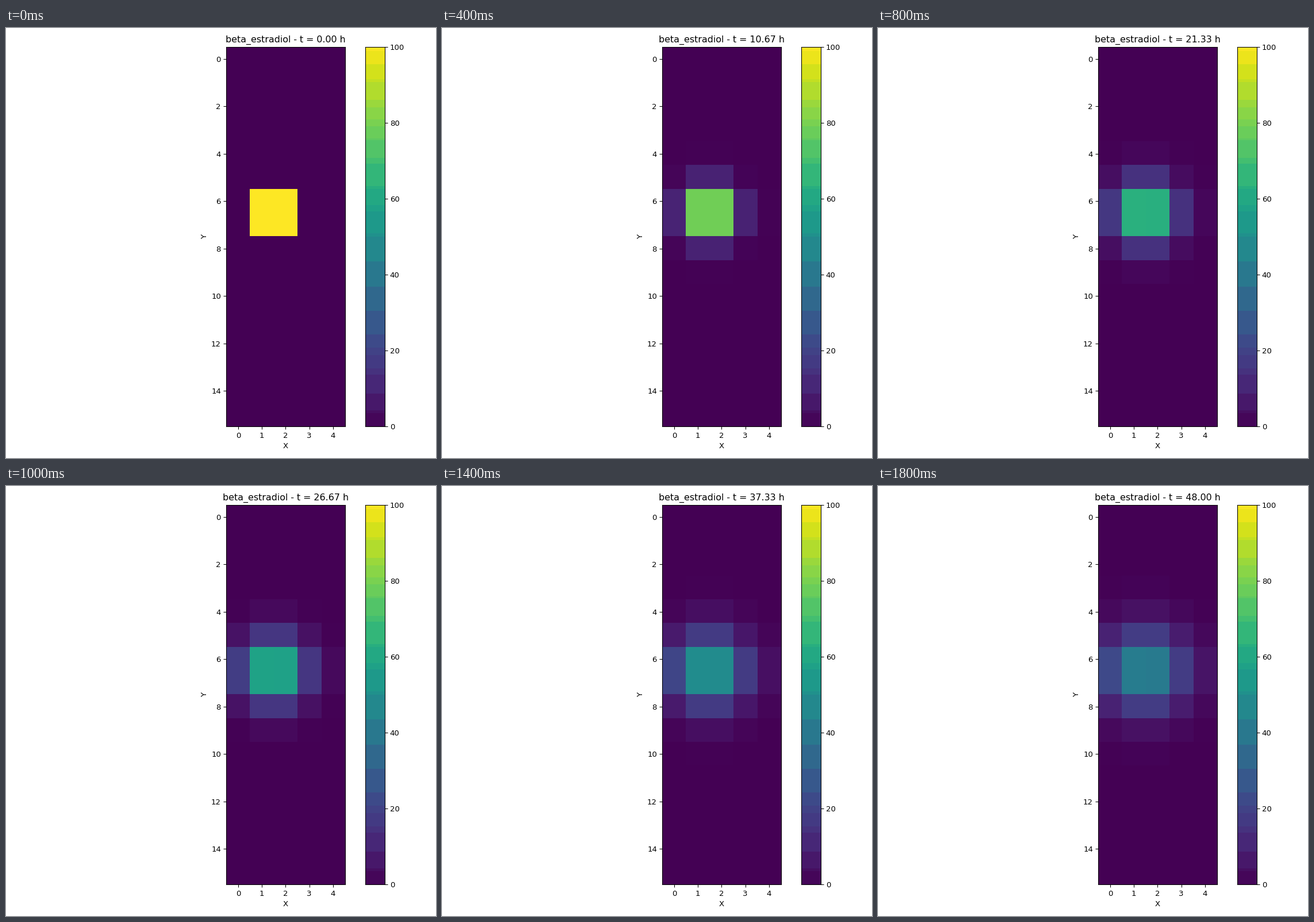
These frames come from a looping animation (748x748 px, 2 s). A matplotlib script:

```python
import numpy as np
import matplotlib.pyplot as plt
from matplotlib.animation import FuncAnimation

SIZE, DPI = 748, 95
ROWS, COLS = 16, 5
FRAMES, INTERVAL = 10, 200
HOURS = 48
RATE = 0.0122  # exchange between neighbouring cells, per hour


def spread(n, cells, t):
    """Diffuse unit amounts along a closed row of n cells for t hours."""
    lap = np.eye(n, k=1) + np.eye(n, k=-1)
    lap -= np.diag(lap.sum(axis=1))
    w, v = np.linalg.eigh(lap)
    start = np.isin(np.arange(n), cells).astype(float)
    return v @ (np.exp(RATE * t * w) * (v.T @ start))


def field(t):
    return 100 * np.outer(spread(ROWS, (6, 7), t), spread(COLS, (1, 2), t))


def banded_scale():
    """Viridis merged into bands that share the same coarse RGB steps."""
    rgb = plt.get_cmap("viridis")(np.arange(256))[:, :3]
    key = (rgb * 255).astype(int) // (32, 16, 32)
    band = np.cumsum(np.any(np.diff(key, axis=0, prepend=key[:1]), axis=1))
    return np.array([rgb[band == b].mean(axis=0) for b in band])


def add_axes(left, top, right, bottom):
    return fig.add_axes([left / SIZE, 1 - bottom / SIZE,
                         (right - left) / SIZE, (bottom - top) / SIZE])


plt.rcParams["font.family"] = "DejaVu Sans"
side = (SIZE + 0.001) / DPI  # guards against rounding down a pixel
fig = plt.figure(figsize=(side, side), dpi=DPI, facecolor="white")

ax = add_axes(383.2, 33, 589.6, 693.4)
image = ax.imshow(field(0), cmap="viridis", vmin=0, vmax=100,
                  interpolation="nearest", aspect="auto")
ax.set_xticks(range(COLS))
ax.set_yticks(range(0, ROWS, 2))
ax.set_xlabel("X")
ax.set_ylabel("Y")
title = ax.set_title("")

bar = add_axes(625.4, 33, 658.6, 693.4)
bar.imshow(banded_scale()[:, None], extent=(0, 1, 0, 100), origin="lower",
           interpolation="nearest", aspect="auto")
bar.set_xticks([])
bar.yaxis.tick_right()
bar.set_yticks(range(0, 101, 20))


def update(i):
    t = HOURS * i / (FRAMES - 1)
    image.set_data(field(t))
    title.set_text(f"beta_estradiol - t = {t:.2f} h")
    return image, title


anim = FuncAnimation(fig, update, frames=FRAMES, interval=INTERVAL,
                     repeat=True, repeat_delay=0, blit=False)
plt.show()
```
